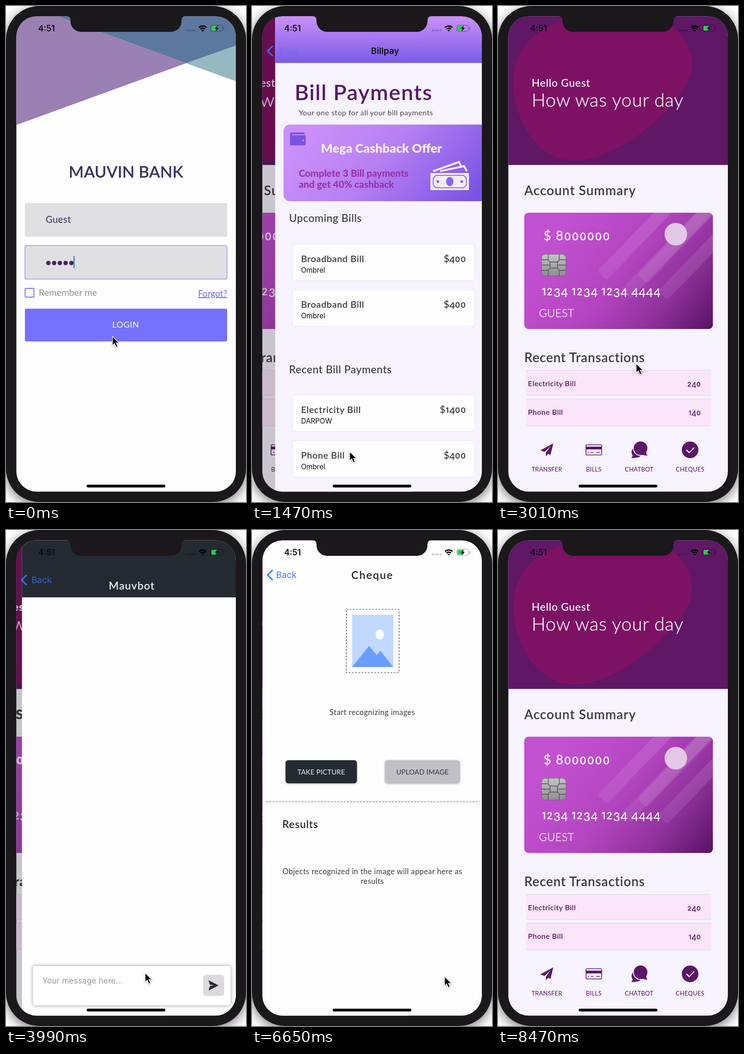
An HTML page for the animation above (8540 ms loop, 521x1075 px).

```html
<!DOCTYPE html>
<html lang="en">
<head>
<meta charset="utf-8">
<title>Banking app walkthrough</title>
<style>
html, body { margin: 0; width: 100%; height: 100%; overflow: hidden; background: #fff; }
svg { display: block; width: 521px; height: 1075px; }
text { font-family: Lato, "Open Sans", sans-serif; white-space: pre; }
.sys { font-family: Inter, Roboto, sans-serif; }
.low { font-family: Inter, Lato, sans-serif; font-size: .81em; letter-spacing: .08em; }
.drop { baseline-shift: -.17em; }
.light { stroke: #f5eff9; stroke-width: .5px; }
.heavy .head { font-weight: 900; letter-spacing: .035em; }
.soft { filter: drop-shadow(0 1px 2px #0005); }
.glow { filter: drop-shadow(0 0 4px #0006); }
.body { filter: drop-shadow(0 6px 12px #0008); }
</style>
</head>
<body>
<svg id="stage" viewBox="0 0 521 1075"></svg>
<script>
const LOOP = 8540, W = 477, LEFT = 22, PLUM = '#5c1668', INK = '#3b393e', NAVY = '#242a32';

const rect = (x, y, w, h, fill, r = 0, more = '') =>
  `<rect x="${x}" y="${y}" width="${w}" height="${h}" rx="${r}" fill="${fill}" ${more}/>`;
const path = (d, fill, more = '') => `<path d="${d}" fill="${fill}" ${more}/>`;
const line = (d, color, width, more = '') =>
  path(d, 'none', `stroke="${color}" stroke-width="${width}" ${more}`);
const circle = (x, y, r, fill, more = '') =>
  `<circle cx="${x}" cy="${y}" r="${r}" fill="${fill}" ${more}/>`;

function plain(x, y, s, size, fill, { w = 400, at = 'start', ls = 0, cls = '', more = '' } = {}) {
  return `<text x="${x}" y="${y}" font-size="${size}" fill="${fill}" font-weight="${w}"
    text-anchor="${at}" letter-spacing="${ls}em" class="${cls}" ${more}>${s}</text>`;
}
const sys = (x, y, s, size, fill, o = {}) => plain(x, y, s, size, fill, { ...o, cls: 'sys' });

// Old-style figures: 0-2 at x-height, 3-5, 7 and 9 hang below the baseline
const oldStyle = s => s.replace(/\d/g, d => '68'.includes(d) ? d :
  `<tspan class="${d < 3 ? 'low' : 'drop'}">${d}</tspan>`);
const text = (x, y, s, size, fill, o = {}) =>
  plain(x, y, oldStyle(s), size, fill, { ls: .02, ...o });

const gradient = (id, pos, stops) =>
  `<linearGradient id="${id}" ${pos}>${stops.map(([o, c]) =>
    `<stop offset="${o}" stop-color="${c}"/>`).join('')}</linearGradient>`;
const screen = (id, bg, body) =>
  `<g id="${id}">${rect(LEFT, 22, W, 1031, bg)}${body}${rect(LEFT, 22, W, 1031, '#000', 0, 'class="dim"')}</g>`;

function login() {
  const field = (y, stroke) => rect(41, y, 439, 73, '#e0dfe2', 3, `stroke="${stroke}"`);
  return path('M22 22H111L391 124L22 258Z', '#9b80b3') +
    path('M111 22H499V86L391 124Z', '#5d789e') +
    path('M499 86L391 124L499 163Z', '#96b9c1') +
    text(260.5, 372, 'MAUVIN BANK', 35, '#3a2f5b', { w: 600, at: 'middle', ls: 0 }) +
    field(427, 'none') + text(86, 470, 'Guest', 20.5, '#3a2f5b') +
    field(519, '#7370ff') +
    [0, 1, 2, 3, 4].map(i => circle(92 + i * 12.5, 557, 4.8, '#3a2a5a')).join('') +
    rect(146.5, 542, 2.2, 26, '#2f6bea') +
    rect(41.5, 612, 19, 19, '#fff', 2, 'stroke="#7370ff" stroke-width="2"') +
    text(71, 628, 'Remember me', 20, '#908e95', { ls: 0 }) +
    text(480, 630, 'Forgot?', 19, '#6c69df', { at: 'end', ls: 0, more: 'text-decoration="underline"' }) +
    rect(41, 656, 439, 71, '#7672ff', 3) +
    text(260, 697, 'LOGIN', 18, '#fff', { at: 'middle', ls: .04 });
}

function home() {
  const heading = { w: 600, ls: .04, cls: 'head' };
  const stripe = (x, y, len) =>
    rect(0, -14, len, 28, 'url(#sheen)', 6, `transform="translate(${x} ${y}) rotate(-46)"`);
  const row = (y, h, name, sum) => rect(61, y, 402, h, '#fae5fa', 3) +
    line(`M61 ${y}H463M61 ${y + h}H463`, '#e2cde6', 1) +
    text(65, y + 34, name, 16, PLUM, { w: 600, ls: .03 }) +
    text(441, y + 34.5, sum, 17, PLUM, { w: 600, at: 'end' });
  const label = (x, s) => text(x, 1009, s, 13, PLUM, { at: 'middle' });
  const chip = rect(94.5, 538, 53, 47, 'url(#metal)', 8, 'stroke="#666" stroke-width="1"') +
    line('M95 550h13l6 6M95 561.5h18M95 573h13l6-6M147 550h-13l-6 6M147 561.5h-18M147 573h-13l-6-6' +
      'M109 538v12M133 538v12M109 585v-12M133 585v-12M113 555h16v13h-16z', '#4c4c4e', 1.3);
  return rect(LEFT, 22, W, 322.5, '#5f1766') +
    path('M33 165C33 110 62 68 115 42C200 5 345 15 388 53C415 78 424 115 421 140C410 200 275 335 165 335C80 335 33 240 33 165Z', '#7d1163') +
    text(73, 175, 'Hello Guest', 23, '#f5eff9', { w: 600, ls: .03, cls: 'head' }) +
    text(73, 218, 'How was your day', 40, '#f5eff9', { w: 300, ls: .02, cls: 'light' }) +
    text(57, 410, 'Account Summary', 28, INK, heading) +
    rect(57, 448, 409.5, 252, 'url(#card)', 9) +
    `<g clip-path="url(#cardClip)">${stripe(226, 584, 230)}${stripe(278, 624, 260)}` +
    `${stripe(313, 592, 230)}${stripe(357, 628, 220)}</g>` +
    text(99, 508, '$ 8000000', 28, '#f8effb', { ...heading, ls: .06 }) +
    circle(386, 494.5, 24.5, '#e3c8e8') + chip +
    text(95, 627, '1234 1234 1234 4444', 26, '#f8effb', { w: 600, ls: .035 }) +
    text(89, 674, 'GUEST', 23.5, '#f8effb', { w: 300, cls: 'light' }) +
    text(57, 772, 'Recent Transactions', 28, INK, { ...heading, ls: .03 }) +
    row(790, 54, 'Electricity Bill', '240') + row(852, 58, 'Phone Bill', '140') +
    path('M120 948L92 963L101 966.5L114 954L104 968V976L109 970.5L114 973Z', PLUM) +
    line('M193 951h30q2 0 2 2v18q0 2-2 2h-30q-2 0-2-2v-18q0-2 2-2z', PLUM, 1.6) +
    rect(191, 955, 34.5, 6, PLUM) + line('M195 967.5h3M201 967.5h6M213 967.5h8', PLUM, 1.5) +
    circle(301.5, 967, 11.5, PLUM) + path('M289 979q5-3 3-9l10 8q-7 3-13 1z', PLUM) +
    circle(309.5, 958.5, 15.7, PLUM, 'stroke="#f7f3ff" stroke-width="1.8"') +
    path('M325 974q-4-3-3-8l-9 6q6 3 12 2z', PLUM) +
    circle(417, 962, 18, PLUM) + line('M409 962l6 6l11-11', '#fff', 2.2) +
    label(106, 'TRANSFER') + label(208, 'BILLS') + label(306.5, 'CHATBOT') + label(417, 'CHEQUES');
}

function bill() {
  const title = (y, s) => text(52, y, s, 23, INK, { w: 500, ls: .025 });
  const item = (y, name, firm, sum) => rect(60, y, 395, 79, '#fffeff', 4, 'stroke="#e4e0ec" stroke-width=".8"') +
    text(78, y + 39, name, 20, INK, { w: 600, ls: .03 }) + sys(78, y + 62, firm, 15.3, '#111') +
    text(437, y + 39, sum, 20.5, INK, { w: 600, at: 'end' });
  return rect(LEFT, 22, W, 101.5, 'url(#bar)') +
    sys(260.5, 104, 'Billpay', 19, '#111', { w: 600, at: 'middle' }) +
    text(64, 204, 'Bill Payments', 47, '#57166b', { w: 600, ls: .033 }) +
    text(73, 237, 'Your one stop for all your bill payments', 16.2, '#4c4a52', { ls: .025 }) +
    rect(40, 257, 441, 166, 'url(#offer)', 14) +
    path('M57 274h27q2 0 2 4h-28v2h28q2 0 2 3v16q0 3-3 3h-28q-3 0-3-3v-21q0-4 3-4z', '#7a52e2') +
    circle(83, 291, 2, '#c98df8') +
    plain(121, 318, 'Mega Cashback Offer', 27, '#f6ecff', { w: 900 }) +
    plain(73, 370, 'Complete 3 Bill payments', 21, '#962aa2', { w: 700 }) +
    plain(73, 394, 'and get 40% cashback', 21, '#962aa2', { w: 700 }) +
    rect(359, 362, 83.5, 37, '#f6ecff') +
    line('M371 367H431l6 6v15l-6 6H371l-6-6v-15z', '#9168e8', 2) +
    `<ellipse cx="401" cy="380.5" rx="8" ry="10" fill="#8d64e8"/>` +
    circle(375, 380.5, 3, '#8d64e8') + circle(427, 380.5, 3, '#8d64e8') +
    line('M365 358L421 338L427 350M380 358L432 347L438 358', '#f6ecff', 4) +
    title(468, 'Upcoming Bills') +
    item(516, 'Broadband Bill', 'Ombrel', '$400') + item(615, 'Broadband Bill', 'Ombrel', '$400') +
    title(796, 'Recent Bill Payments') +
    item(843, 'Electricity Bill', 'DARPOW', '$1400') + item(942, 'Phone Bill', 'Ombrel', '$400');
}

function chat() {
  return rect(LEFT, 22, W, 124, NAVY) +
    text(260.5, 129, 'Mauvbot', 23, '#f1f1f3', { w: 600, at: 'middle', ls: .05 }) +
    rect(46, 945, 429, 85, '#fff', 5, 'class="glow"') +
    sys(66, 983, 'Your message here...', 17.5, '#9c9ba1') +
    rect(415, 964, 46, 46, '#dcdadd', 7) +
    path('M427 976L449 987L427 998L430 988.5L439 987L430 985.5Z', NAVY);
}

function cheque() {
  const button = (x, w, fill, color, s) => rect(x, 499, w, 50, fill, 6, 'class="soft"') +
    text(x + w / 2, 529.5, s, 15, color, { at: 'middle', ls: .01 });
  const note = (y, s) => text(260.5, y, s, 16.5, '#3b3a40', { at: 'middle', ls: .025 });
  return text(260.5, 106, 'Cheque', 23.5, '#26262c', { w: 600, at: 'middle', ls: .08 }) +
    rect(204, 172, 114.5, 137, 'none', 0, 'stroke="#333" stroke-width="1.2" stroke-dasharray="4 3"') +
    rect(216.5, 184, 89.5, 113, '#c1d8ff') +
    '<ellipse cx="276.5" cy="226.5" rx="9" ry="11" fill="#fff"/>' +
    path('M216.5 297L253.5 251L270 271L278 262L306 297Z', '#6a9dff') +
    note(401, 'Start recognizing images') +
    button(72, 155, NAVY, '#eee', 'TAKE PICTURE') +
    button(288, 162.5, '#c1c0c6', '#34343a', 'UPLOAD IMAGE') +
    line('M30 589H493', '#444', 1.2, 'stroke-dasharray="4 3"') +
    text(65, 646, 'Results', 23, '#2c2b30', { w: 600, ls: .03 }) +
    note(746, 'Objects recognized in the image will appear here as') + note(767, 'results');
}

function status() {
  const dots = [393, 398.5, 404, 409.5].map(x => rect(x - 2, 51, 4, 4, '#0003', 1)).join('');
  return sys(88, 55, '4:51', 18, '#0b0b0d', { w: 600, at: 'middle' }) + dots +
    line('M419 46.5a12 12 0 0 1 16 0M422 50a7.5 7.5 0 0 1 10 0', '#000', 2.8) +
    path('M424 52.5a5 5 0 0 1 6 0l-3 3z', '#000') +
    rect(444.5, 41.5, 26, 13.5, 'none', 4, 'stroke="#0006"') + rect(472, 46, 1.5, 5, '#0006') +
    rect(446, 43, 13, 10.5, '#32c85a', 2) + path('M460 42l-7 7h4l-2 6l7-7.500h-4z', '#000');
}

const stage = document.getElementById('stage');
const fixed = pos => `gradientUnits="userSpaceOnUse" ${pos}`;
stage.innerHTML = `<defs>
  <clipPath id="glass">${rect(LEFT + .5, 22.5, W - .5, 1030, '#000', 44)}</clipPath>
  <clipPath id="cardClip">${rect(57, 448, 409.5, 252, '#000', 9)}</clipPath>
  ${gradient('card', fixed('x1="140" y1="470" x2="465" y2="715"'), [[0, '#c251d1'], [.4, '#b445c0'], [.7, '#8f319b'], [1, '#541060']])}
  ${gradient('bar', fixed('x1="0" y1="22" x2="0" y2="123"'), [[0, '#cb90fc'], [1, '#7a5ce6']])}
  ${gradient('offer', fixed('x1="130" y1="220" x2="420" y2="460"'), [[0, '#cb90fa'], [.45, '#b67ff3'], [1, '#7953e2']])}
  ${gradient('metal', fixed('x1="0" y1="538" x2="0" y2="585"'), [[0, '#c4c4c6'], [1, '#8e8e92']])}
  ${gradient('sheen', '', [[0, '#ffffff14'], [1, '#ffffff1f']])}
  </defs>` +
  rect(0, 0, 521, 1075, '#1a181b', 72, 'class="body"') +
  `<g clip-path="url(#glass)">
  ${screen('login', '#fffeff', login())}${screen('home', '#f7f3ff', home())}
  ${screen('bill', '#f7f3ff', bill())}${screen('chat', '#fffeff', chat())}
  ${screen('cheque', '#fffeff', cheque())}
  <g id="back">${line('M45 86.500L34 97.500L45 108.500', '#3478f6', 3)}${sys(52, 104, 'Back', 19, '#3478f6', { more: 'id="label"' })}</g>
  </g>` +
  path('M131 21v1q9 0 9 9v2a23 23 0 0 0 23 23H358a23 23 0 0 0 23-23v-2q0-9 9-9v-1z', '#1a181b') +
  status() + rect(175, 1037.5, 171, 6, '#000', 3) +
  path('M0 0v20l4.600-4.300l3.600 8l3.600-1.600l-3.500-7.800h6.500z', '#000', 'id="pointer" class="soft" stroke="#fff" stroke-width="1.300"');

const el = id => document.getElementById(id);
const names = ['login', 'home', 'bill', 'chat', 'cheque'];

// [start, lower screen, upper screen, 1 = push / 0 = pop]
const moves = [
  [-1000, 'login', 'home', 0], [280, 'login', 'home', 1],
  [1340, 'home', 'bill', 1], [2640, 'home', 'bill', 0],
  [3832, 'home', 'chat', 1], [4980, 'home', 'chat', 0],
  [6400, 'home', 'cheque', 1], [7900, 'home', 'cheque', 0]];

const trail = [
  [0, 231, 716], [330, 231, 716], [950, 212, 966], [1600, 212, 966], [2300, 60, 98],
  [2720, 60, 98], [3010, 300, 775], [3350, 302, 960], [4250, 302, 960], [4900, 68, 102],
  [5180, 68, 102], [6000, 418, 968], [6800, 418, 968], [7550, 60, 98], [7980, 60, 98], [8400, 200, -40]];

const clamp = v => Math.max(0, Math.min(1, v));
const spring = ms => (1 + ms * .0346) * Math.exp(-ms * .0346);

function pointerAt(t) {
  const i = trail.findIndex(k => k[0] > t);
  if (i < 0) return trail[trail.length - 1].slice(1);
  const [t0, x0, y0] = trail[i - 1], [t1, x1, y1] = trail[i];
  const u = (t - t0) / (t1 - t0), e = u * u * (3 - 2 * u);
  return [x0 + (x1 - x0) * e, y0 + (y1 - y0) * e];
}

function place(id, x, dim) {
  el(id).setAttribute('transform', `translate(${x} 0)`);
  el(id).querySelector('.dim').setAttribute('opacity', dim);
}

function draw(t) {
  const [start, lower, upper, push] = moves.filter(m => m[0] <= t).pop();
  const rest = spring(t - start), shown = push ? 1 - rest : rest;
  for (const n of names)
    el(n).style.display = n === lower || n === upper && shown > .001 ? '' : 'none';
  place(lower, -shown * W / 3, shown * .2);
  place(upper, (1 - shown) * W, 0);
  el('home').classList.toggle('heavy', t >= 3832 && t < 6400);

  const off = (1 - shown) * W;
  el('back').setAttribute('opacity', upper === 'home' ? 0 : clamp((shown - .1) / .7));
  el('back').setAttribute('transform', `translate(0 ${upper === 'chat' ? 11 : 0})`);
  el('label').setAttribute('transform', `translate(${off * .25} 0)`);
  el('label').setAttribute('opacity', clamp(1 - off / 45));
  el('pointer').setAttribute('transform', `translate(${pointerAt(t)})`);
}

const begin = performance.now();
function tick() {
  draw((performance.now() - begin) % LOOP);
  requestAnimationFrame(tick);
}
tick();
</script>
</body>
</html>
```
